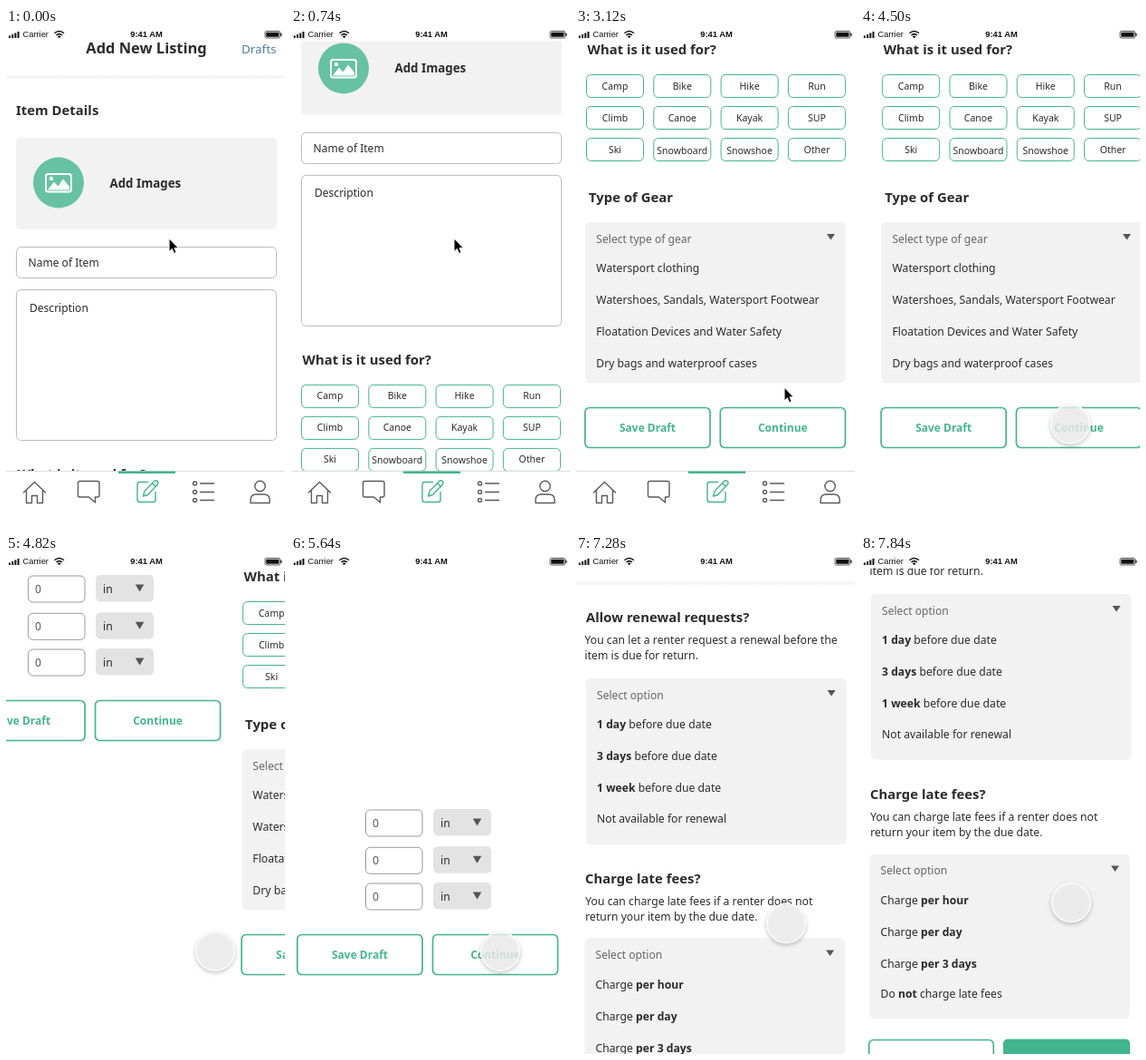
An HTML page for the animation above (8000 ms loop, 308 by 550 pixels).

```html
<!DOCTYPE html>
<html lang="en">
<head>
<meta charset="utf-8">
<title>Add New Listing</title>
<style>
  html, body { margin: 0; width: 100%; height: 100%; overflow: hidden; background: #fff; }
  svg { display: block; width: 308px; height: 550px; font: 12.2px "Noto Sans", sans-serif; fill: #2b2b2b; }
  .line { fill: none; stroke: #5a5a5a; stroke-width: 1.4; stroke-linejoin: round; stroke-linecap: round; }
  .teal { stroke: #43b58e; }
  #status text { font-family: "Liberation Sans", Arial, sans-serif; fill: #111; }
  #touch { filter: drop-shadow(0 2px 2px rgba(0, 0, 0, .25)); }
</style>
</head>
<body>
<svg viewBox="0 0 308 550">
  <defs>
    <linearGradient id="shade" x2="0" y2="1">
      <stop offset="0" stop-color="#f0f0f0"/>
      <stop offset="1" stop-color="#fff"/>
    </linearGradient>
  </defs>
  <g id="form"></g>
  <g id="size"></g>
  <g id="fees"></g>
  <g id="tabs">
    <rect y="488" width="308" height="62" fill="#fff"/>
    <rect y="488" width="308" height="1" fill="#ddd"/>
    <rect x="124" y="488.5" width="63" height="2.5" fill="#43b58e"/>
    <g class="line">
      <path d="M19.5 512 31.5 500.5 43.5 512M22.5 510V523.5H28.5V515.5H34.5V523.5H40.5V510"/>
      <path d="M81.5 499.5H101Q103 499.5 103 501.5V515Q103 517 101 517H98.500V523L91.500 517H81.500Q79.500 517 79.500 515V501.500Q79.500 499.500 81.500 499.500Z"/>
      <path class="teal" d="M156.500 500.500H147.500Q145 500.500 145 503V520Q145 522.500 147.500 522.500H162.500Q165 522.500 165 520V511.500M151.500 516 153 510.500 163.500 499.500Q165.500 497.800 167.200 499.600T167 503.500L156.500 514.500ZM161.500 501.700 165 505.300"/>
      <path d="M214.500 502H229.500M214.500 511.500H229.500M214.500 520.500H229.500"/>
      <circle cx="208.500" cy="502" r="2"/>
      <circle cx="208.500" cy="511.500" r="2"/>
      <circle cx="208.500" cy="520.500" r="2"/>
      <circle cx="280.500" cy="505" r="5.700"/>
      <path d="M270 523.500V520Q270 514.500 275.500 514H285.500Q291 514.500 291 520V523.500Z"/>
    </g>
  </g>
  <g id="status">
    <rect width="308" height="14.500" fill="#fff"/>
    <path d="M3 8.500h2v2.500h-2zM6.200 7h2v4h-2zM9.400 5.500h2v5.500h-2zM12.600 4h2v7h-2z" fill="#111"/>
    <text x="18.500" y="10.300" font-size="9.300">Carrier</text>
    <path d="M53.500 5.800Q58.700 1.200 64 5.800M55.500 8Q58.700 5.200 62 8" fill="none" stroke="#111" stroke-width="1.500"/>
    <path d="M56.800 9.300Q58.700 7.800 60.700 9.300L58.700 11.300Z" fill="#111"/>
    <text x="155" y="10.300" font-size="9.400" font-weight="700" text-anchor="middle">9:41 AM</text>
    <rect x="286" y="3.500" width="16.500" height="7.500" rx="1.500" fill="none" stroke="#111" stroke-width=".7"/>
    <rect x="287.200" y="4.700" width="14.100" height="5.100" rx=".6" fill="#111"/>
    <rect x="303.300" y="5.800" width="1.200" height="3" fill="#111"/>
  </g>
  <path id="cursor" d="M0 0V14.500L3.300 11.400 5.500 16.500 8 15.400 5.900 10.500H10.300Z" fill="#000" stroke="#fff"/>
  <g id="touch"><circle r="21.500" fill="#f5f5f5" fill-opacity=".78" stroke="#fbfbfb" stroke-width="1.500"/></g>
</svg>
<script>
const $ = id => document.getElementById(id);
const TEAL = '#43b58e', GRAY = '#f2f2f2';

// Markup helpers
const text = (x, y, s, attrs = '') => `<text x="${x}" y="${y}" ${attrs}>${s}</text>`;
const mid = (x, y, s, attrs) => text(x, y, s, `text-anchor="middle" ${attrs}`);
const heading = (x, y, s) => text(x, y, s, 'font-size="14.900" font-weight="700"');
const box = (x, y, w, h, fill, stroke = 'none', width = 1) =>
  `<rect x="${x}" y="${y}" width="${w}" height="${h}" rx="5" fill="${fill}" stroke="${stroke}" stroke-width="${width}"/>`;
const arrow = (x, y, w = 9, h = 6.5) => `<path d="M${x - w / 2} ${y}h${w}l${-w / 2} ${h}z" fill="#555"/>`;
const bold = s => s.replace(/\*(.+?)\*/g, '<tspan font-weight="700">$1</tspan>');

const header = () =>
  mid(155, 52, 'Add New Listing', 'font-size="16.450" font-weight="700"') +
  text(260, 52, 'Drafts', 'font-size="13.400" fill="#4d80a0"') +
  '<rect y="76.500" width="308" height="5" fill="url(#shade)"/>';

const select = (x, y, w, h, label, options) =>
  box(x, y, w, h, GRAY) +
  text(x + 12, y + 22.7, label, 'font-size="12.100" fill="#666"') +
  arrow(x + w - 16.5, y + 13) +
  options.map((s, i) => text(x + 12, y + [55, 90, 125, 158.5][i] + (options.last && i === 3 ? options.last : 0), bold(s))).join('');

const button = (x, y, w, label) =>
  box(x, y, w, 44, '#fff', TEAL, 1.7) +
  mid(x + w / 2, y + 26, label, `font-size="12" font-weight="700" fill="${TEAL}"`);

const uses = 'Camp Bike Hike Run Climb Canoe Kayak SUP Ski Snowboard Snowshoe Other'.split(' ');
const chips = uses.map((s, i) => {
  const x = 11.5 + i % 4 * 74.3, y = 543.5 + (i / 4 | 0) * 35;
  const drop = s.startsWith('Snow') ? 1 : 0;
  return box(x, y, 63, 25, '#fff', TEAL) + mid(x + 31.5, y + 16 + drop, s, 'font-size="10.500"');
}).join('');

const gear = ['Watersport clothing', 'Watershoes, Sandals, Watersport Footwear',
  'Floatation Devices and Water Safety', 'Dry bags and waterproof cases'];
gear.last = 1.2;

$('form').innerHTML = header() +
  heading(11, 120, 'Item Details') +
  box(11, 145, 288, 101, GRAY) +
  '<circle cx="58" cy="194.500" r="28" fill="#66c2a3"/>' +
  '<rect x="44" y="185" width="28" height="19.500" rx="2.500" fill="none" stroke="#fff" stroke-width="2"/>' +
  '<path d="M46 202.500 53 193.500 57.500 198.500 63 190.500 70 199V202.500Z" fill="#fff"/>' +
  '<circle cx="50" cy="190" r="2.200" fill="#fff"/>' +
  text(114.5, 199.5, 'Add Images', 'font-size="13.300" font-weight="700"') +
  box(11.5, 265.5, 287, 34, '#fff', '#bbb') + text(24.5, 287, 'Name of Item', 'font-size="12.050"') +
  box(11.5, 312.5, 287, 166, '#fff', '#bbb') + text(26, 336.5, 'Description', 'font-size="12.050"') +
  heading(12.5, 521, 'What is it used for?') + chips +
  heading(14, 684, 'Type of Gear') +
  select(10.3, 706, 287.5, 177, 'Select type of gear', gear) +
  button(10, 910.5, 138, 'Save Draft') + button(159.3, 910.5, 138, 'Continue');

$('size').innerHTML = '<rect width="308" height="550" y="0" fill="#fff"/>' +
  [22.5, 63.8, 103.5].map(y =>
    box(82.5, y + .5, 62.5, 29, '#fff', '#999') + text(90, y + 19.5, '0', 'fill="#555"') +
    box(157, y - .5, 64, 29.5, '#e3e3e3') + text(165, y + 19, 'in') + arrow(205.5, y + 10, 9.5, 8)).join('') +
  button(7, 160.5, 138, 'Save Draft') + button(156.5, 160.5, 138, 'Continue');

$('fees').innerHTML = header() +
  box(11, 33, 32, 26, GRAY) +
  '<path class="line" d="M34 46H20.500M25.500 41 20.500 46 25.500 51" style="stroke:#222"/>' +
  heading(11, 121, 'Allow renewal requests?') +
  text(9.5, 145.3, 'You can let a renter request a renewal before the') +
  text(9.5, 161.7, 'item is due for return.') +
  select(11, 183, 287.5, 183, 'Select option',
    ['*1 day* before due date', '*3 days* before due date', '*1 week* before due date', 'Not available for renewal']) +
  heading(10, 409, 'Charge late fees?') +
  text(10.3, 433, 'You can charge late fees if a renter does not') +
  text(10.3, 449.5, 'return your item by the due date.') +
  select(9.5, 469.5, 287.5, 181.5, 'Select option',
    ['Charge *per hour*', 'Charge *per day*', 'Charge *per 3 days*', 'Do *not* charge late fees']) +
  box(8.8, 674.5, 137.5, 44, '#fff', TEAL, 1.7) + box(157, 673.5, 140, 46, TEAL);

// Eased value between keyframes [time, value]
const easeOut = u => 1 - (1 - u) ** 1.6;
function track(t, keys) {
  const i = keys.findIndex(k => k[0] > t);
  if (i === 0) return keys[0][1];
  if (i < 0) return keys[keys.length - 1][1];
  const [t0, a] = keys[i - 1], [t1, b] = keys[i];
  return a + (b - a) * easeOut((t - t0) / (t1 - t0));
}

const formScroll = [[20, 24], [440, 143], [720, 143], [740, 149], [880, 245], [1200, 245],
  [1380, 374], [1700, 374], [1820, 436], [2200, 436], [2600, 492]];
const feesScroll = [[7180, 0], [7400, 75], [7680, 75], [7840, 140]];
const cursorX = [[2740, 180], [3120, 230]];
const cursorY = [[2740, 232], [3120, 396], [3340, 439]];
const touchX = [[3920, 231], [4120, 225], [4340, 231], [5620, 231], [6120, 232]];
const touchY = [[5620, 436.5], [6120, 438.5], [6660, 438.5], [6980, 416], [7180, 416], [7400, 400], [7680, 400], [7840, 383]];

const move = (id, x, y, k = 1) => $(id).setAttribute('transform', `translate(${x} ${y}) scale(${k})`);
const show = (id, on) => $(id).style.display = on ? '' : 'none';

function draw(t) {
  const u = Math.min(1, Math.max(0, (t - 4490) / 660));
  const slide = 308 * (1 - (1 - u) ** 2.4);
  const snapped = t >= 5180;

  show('form', !snapped);
  show('size', t >= 4500 && t < 6360);
  show('fees', t >= 6360);
  show('tabs', t < 4500);
  show('cursor', t < 3600);
  show('touch', t >= 3600);

  move('form', slide, -track(t, formScroll));
  move('size', slide - 308, snapped ? 258 : 0);
  move('fees', 0, -track(t, feesScroll));
  move('cursor', track(t, cursorX), track(t, cursorY));

  const grow = track(t, [[3580, 0], [3800, 1]]);
  move('touch', track(t, touchX), track(t, touchY), .6 + .4 * grow);
  $('touch').style.opacity = grow;
}

const start = performance.now();
(function tick() {
  draw((performance.now() - start) % 8000);
  requestAnimationFrame(tick);
})();
</script>
</body>
</html>
```
